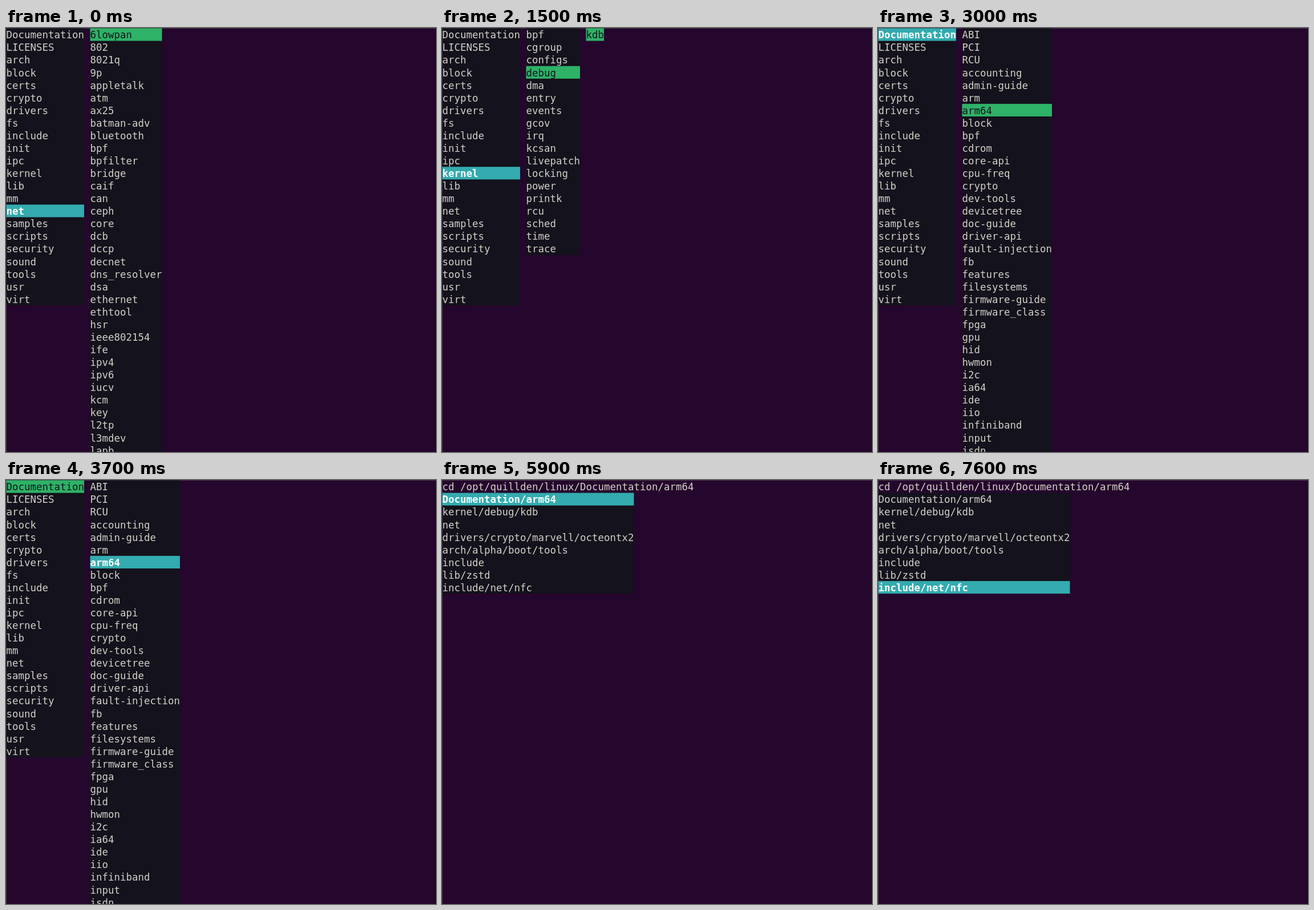
An HTML page that plays this animation: 754x743 px, repeating every 8000 ms.

```html
<!DOCTYPE html>
<html lang="en">
<head>
<meta charset="utf-8">
<title>Directory navigator</title>
<style>
  html, body { margin: 0; width: 100%; height: 100%; overflow: hidden; background: #25062d; }
  svg { display: block; width: 754px; height: 743px; }
  text { font: 17.44px "DejaVu Sans Mono", monospace; fill: #d3d0c7; white-space: pre; }
  .panel { fill: #14121c; }
  .active { fill: #33abaf; }
  .path { fill: #2eb267; }
  text.active { fill: #fff; font-weight: bold; }
  text.path { fill: #14121c; }
  .cursor { fill: #d3d0c7; }
  .edge { fill: none; stroke: #403b43; }
</style>
</head>
<body>
<svg viewBox="0 0 754 743">
  <path class="edge" d="M.5 743V.5H754"/>
  <g id="screen"></g>
</svg>
<script>
const CELL_W = 10.5, CELL_H = 22.07, ORIGIN = 0.5, BASELINE = 17.8;
const LOOP = 8000;
const words = s => s.trim().split(/\s+/);

const root = words(`Documentation LICENSES arch block certs crypto drivers fs include init ipc
  kernel lib mm net samples scripts security sound tools usr virt`);
const children = {
  net: words(`6lowpan 802 8021q 9p appletalk atm ax25 batman-adv bluetooth bpf bpfilter bridge
    caif can ceph core dcb dccp decnet dns_resolver dsa ethernet ethtool hsr ieee802154 ife
    ipv4 ipv6 iucv kcm key l2tp l3mdev lapb`),
  mm: ['kasan'],
  lib: words(`842 crypto dim fonts kunit livepatch lz4 lzo math mpi pldmfw raid6 reed_solomon
    vdso xz zlib_deflate zlib_dfltcc zlib_inflate zstd`),
  kernel: words(`bpf cgroup configs debug dma entry events gcov irq kcsan livepatch locking
    power printk rcu sched time trace`),
  debug: ['kdb'],
  Documentation: words(`ABI PCI RCU accounting admin-guide arm arm64 block bpf cdrom core-api
    cpu-freq crypto dev-tools devicetree doc-guide driver-api fault-injection fb features
    filesystems firmware-guide firmware_class fpga gpu hid hwmon i2c ia64 ide iio infiniband
    input isdn`)
};
const recent = words(`Documentation/arm64 kernel/debug/kdb net drivers/crypto/marvell/octeontx2
  arch/alpha/boot/tools include lib/zstd include/net/nfc`);
const cwd = '/opt/quillden/linux/Documentation/arm64';

const colX = col => ORIGIN + col * CELL_W;
const rowY = row => ORIGIN + row * CELL_H;
const rect = (col, row, w, h, cls) =>
  `<rect class="${cls}" x="${colX(col)}" y="${rowY(row)}" width="${w * CELL_W}" height="${h * CELL_H}"/>`;
const text = (col, row, s, cls = '') =>
  `<text class="${cls}" x="${colX(col)}" y="${rowY(row) + BASELINE}">${s}</text>`;
const widest = items => Math.max(...items.map(s => s.length));

function menu(items, col, row, picked, cls) {
  const w = widest(items), index = items.indexOf(picked);
  return rect(col, row, w, items.length, 'panel') +
    (index < 0 ? '' : rect(col, row + index, w, 1, cls)) +
    items.map((s, i) => text(col, row + i, s, i === index ? cls : '')).join('');
}

// Columns for a selected path; the focused level is teal, the others green.
function browse(path, focus = 0) {
  let col = 0, items = root, out = '';
  path.forEach((name, level) => {
    out += menu(items, col, 0, name, level === focus ? 'active' : 'path');
    col += widest(items) + 1;
    items = children[name];
  });
  return out;
}

const echo = text(0, 0, `cd ${cwd}`);
function prompt(typed) {
  const line = `${cwd} $${typed}`;
  return echo + text(0, 1, line) + rect(line.length, 1, 1, 1, 'cursor');
}
const history = index => echo + menu(recent, 0, 1, recent[index], 'active');

const scenes = [
  [0, browse(['net', '6lowpan'])],
  [200, browse(['mm', 'kasan'])],
  [900, browse(['lib', 'zstd'])],
  [1500, browse(['kernel', 'debug', 'kdb'])],
  [1600, browse(['ipc'])],
  [2200, browse(['init'])],
  [3000, browse(['Documentation', 'arm64'])],
  [3700, browse(['Documentation', 'arm64'], 1)],
  [4800, prompt('')],
  [5800, prompt('cd "$(dirs_menu)"')],
  [5900, history(0)],
  [6400, history(1)],
  [6700, history(3)],
  [6800, history(4)],
  [6900, history(5)],
  [7500, history(6)],
  [7600, history(7)]
];

const screen = document.getElementById('screen');
let shown;
function draw() {
  const t = performance.now() % LOOP;
  const scene = scenes.findLast(([start]) => start <= t);
  if (scene !== shown) {
    shown = scene;
    screen.innerHTML = scene[1];
  }
  requestAnimationFrame(draw);
}
draw();
</script>
</body>
</html>
```
